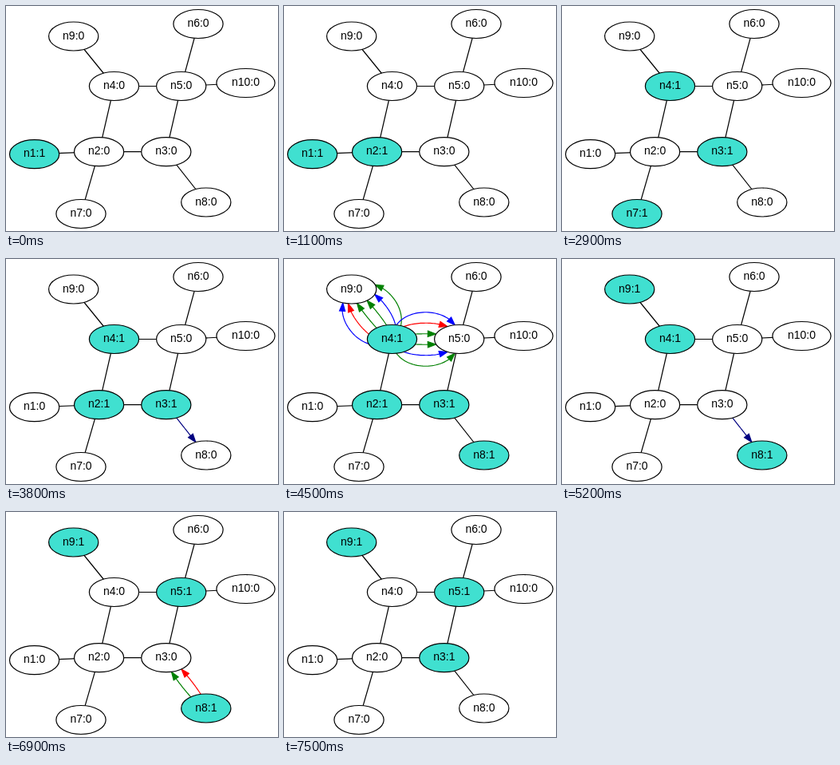
An HTML page for the animation above (8000 ms loop, 341 by 282 pixels).

```html
<!DOCTYPE html>
<html lang="en">
<head>
<meta charset="utf-8">
<title>Network messages</title>
<style>
html, body { margin: 0; width: 100%; height: 100%; overflow: hidden; background: #fff; }
svg { display: block; }
text { font: 14px "Liberation Sans", Arial, sans-serif; text-anchor: middle; }
</style>
</head>
<body>
<svg id="stage" width="341" height="282" viewBox="0 0 341 282" stroke-width="1.2">
  <g id="links" fill="none" stroke="#000"></g>
  <g id="arrows"></g>
  <g id="nodes"></g>
</svg>
<script>
const LOOP = 8000, RX = 31.1, RY = 18, GAP = 18, HEAD = 10;
const INK = { b: '#0000ff', r: '#ff0000', g: '#008000', n: '#000080' };

const nodes = {
  1: [35.6, 185.7], 2: [116.6, 182.7], 3: [200.8, 182.7], 4: [135.5, 100.5],
  5: [219.7, 100.5], 6: [241, 22.5], 7: [94, 260.5], 8: [250.8, 246],
  9: [84.7, 38], 10: [300.5, 96.5]
};
const links = ['1-2', '2-3', '2-4', '2-7', '3-5', '3-8', '4-5', '4-9', '5-6', '5-10'];

// time, active nodes, arrows as "from>to:colours" (colours run left to right)
const steps = [
  [0, '1', ''],
  [300, '1', '1>2:b'],
  [400, '1', '1>2:br'],
  [500, '1', '1>2:brg'],
  [600, '1', '1>2:brgg'],
  [700, '1', '1>2:brggb'],
  [800, '1', '1>2:brggbg'],
  [900, '12', '1>2:n'],
  [1000, '12', '2>3:n 2>4:n 2>7:n'],
  [1100, '12', ''],
  [1200, '2', '2>3:br 2>4:br 2>7:br'],
  [1300, '2', '2>3:brg 2>4:brg 2>7:brg'],
  [1400, '2', '2>3:brgg 2>4:brgg 2>7:brgg'],
  [1500, '2', '2>3:brggbg 2>4:brggbg 2>7:brggbg'],
  [1600, '27', '2>7:n'],
  [1700, '247', '2>4:n'],
  [1800, '247', ''],
  [2000, '247', '4>5:n 4>9:n'],
  [2100, '247', '2>3:br'],
  [2200, '247', '2>3:brg'],
  [2300, '247', '2>3:brgg'],
  [2400, '247', '2>3:brggbg'],
  [2500, '2347', '2>3:n'],
  [2600, '347', '2>7:n'],
  [2700, '347', '3>8:n'],
  [2800, '347', '4>5:n 3>5:n'],
  [2900, '347', ''],
  [3300, '347', '7>2:br'],
  [3400, '347', '7>2:brg'],
  [3500, '347', '7>2:brgg'],
  [3600, '347', '7>2:brggbg'],
  [3700, '2347', '7>2:n'],
  [3800, '234', '3>8:n'],
  [3900, '234', ''],
  [4100, '2348', '4>9:br 4>5:br'],
  [4200, '2348', '4>9:brg 4>5:brg'],
  [4300, '2348', '4>9:brgg 4>5:brgg'],
  [4400, '2348', '4>9:brggb 4>5:brggb'],
  [4500, '2348', '4>9:brggbg 4>5:brggbg'],
  [4600, '2348', ''],
  [4800, '23489', '4>9:n'],
  [4900, '23489', '2>3:gr'],
  [5000, '3489', '2>3:n'],
  [5100, '3489', '3>8:gr'],
  [5200, '489', '3>8:n'],
  [5300, '489', '4>5:n'],
  [5400, '589', ''],
  [5600, '589', '5>4:n 5>6:n 5>10:n 5>3:n'],
  [5700, '589', ''],
  [5900, '589', '5>4:n'],
  [6000, '589', '5>10:n'],
  [6100, '589', '5>3:n'],
  [6200, '589', '5>4:n 5>10:n 5>3:n'],
  [6300, '589', ''],
  [6500, '589', '9>4:n'],
  [6600, '589', ''],
  [6900, '589', '8>3:gr'],
  [7000, '589', '8>3:grb'],
  [7100, '589', '8>3:grbg'],
  [7200, '3589', '8>3:n'],
  [7300, '359', '9>4:n 5>6:n'],
  [7400, '359', '3>8:n'],
  [7500, '359', '']
];

const $ = id => document.getElementById(id);
const rx = id => id == 10 ? RX + 5.5 : RX;

function add(parent, tag, attrs) {
  const el = document.createElementNS('http://www.w3.org/2000/svg', tag);
  for (const k in attrs) el.setAttribute(k, attrs[k]);
  return parent.appendChild(el);
}

const linkEls = links.map(key => {
  const [a, b] = key.split('-').map(id => nodes[id]);
  return add($('links'), 'path', { d: `M${a}L${b}` });
});
const nodeEls = Object.entries(nodes).map(([id, [x, y]]) => ({
  id,
  body: add($('nodes'), 'ellipse', { cx: x, cy: y, rx: rx(id), ry: RY, stroke: '#000' }),
  label: add($('nodes'), 'text', { x, y: Math.floor(y + 4) })
}));

// cubic whose control points sit straight beside the two node centres
function arrow(from, to, offset, color) {
  const [ax, ay] = nodes[from], [bx, by] = nodes[to];
  const dx = bx - ax, dy = by - ay, len = Math.hypot(dx, dy);
  const ox = dy / len * offset, oy = -dx / len * offset;
  const at = t => {
    const bow = 3 * t * (1 - t), along = t * t * (3 - 2 * t);
    return [ax + dx * along + ox * bow, ay + dy * along + oy * bow];
  };
  const inside = ([x, y]) => ((x - bx) / rx(to)) ** 2 + ((y - by) / RY) ** 2 < 1;
  let t = 1;
  while (t > 0 && inside(at(t))) t -= 0.002;
  const tip = at(t);
  let base = tip;
  while (t > 0 && Math.hypot(base[0] - tip[0], base[1] - tip[1]) < HEAD) base = at(t -= 0.002);

  const pts = [];
  for (let i = 0; i <= 40; i++) pts.push(at(t * i / 40));
  add($('arrows'), 'path', { d: 'M' + pts.join('L'), fill: 'none', stroke: color });
  const wx = (tip[1] - base[1]) * 0.35, wy = (base[0] - tip[0]) * 0.35;
  add($('arrows'), 'path', {
    d: `M${tip}L${base[0] + wx},${base[1] + wy}L${base[0] - wx},${base[1] - wy}Z`,
    fill: color, stroke: color
  });
}

function show([, active, arrows]) {
  const busy = new Set();
  $('arrows').replaceChildren();
  for (const item of arrows.split(' ').filter(Boolean)) {
    const [from, to, colors] = item.split(/[>:]/);
    busy.add(`${from}-${to}`).add(`${to}-${from}`);
    [...colors].forEach((c, i) =>
      arrow(from, to, GAP * ((colors.length - 1) / 2 - i), INK[c]));
  }
  links.forEach((key, i) =>
    linkEls[i].setAttribute('visibility', busy.has(key) ? 'hidden' : 'visible'));
  for (const { id, body, label } of nodeEls) {
    const on = active.includes(id);
    body.setAttribute('fill', on ? '#40e0d0' : '#fff');
    label.textContent = `n${id}:${on ? 1 : 0}`;
  }
}

let current;
function tick() {
  const t = performance.now() % LOOP;
  const step = steps.findLast(s => s[0] <= t);
  if (step !== current) show(current = step);
  requestAnimationFrame(tick);
}
tick();
</script>
</body>
</html>
```
